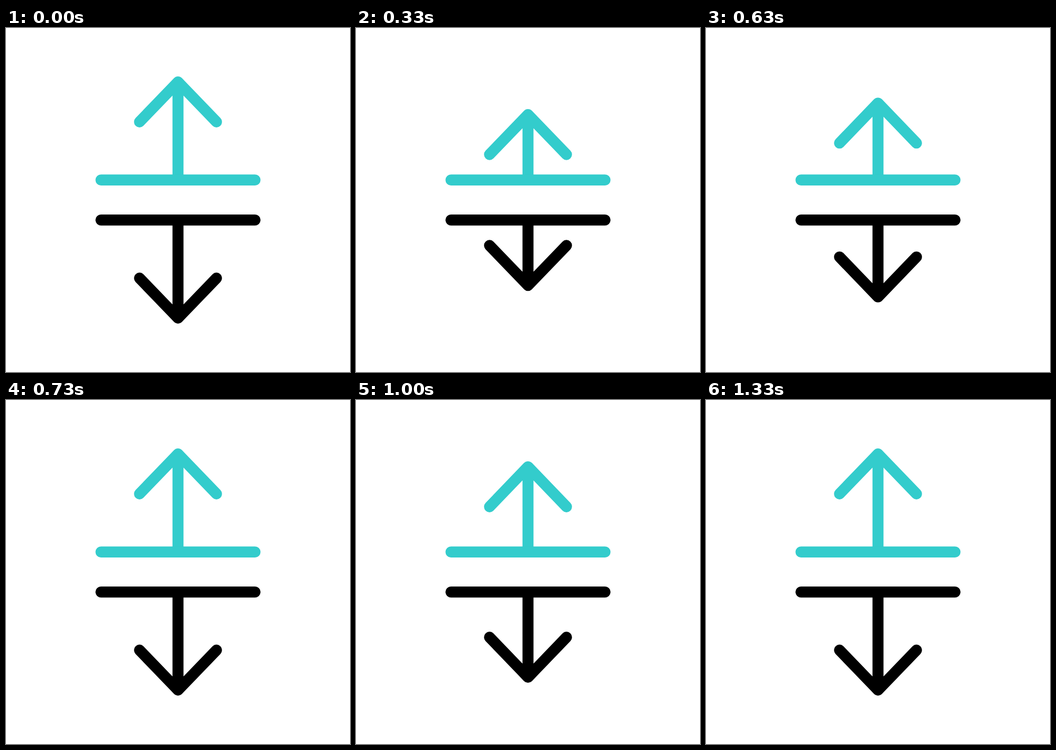
Write an HTML page that moves like this. It is 640 px wide and 640 px high and loops after 2 s.

```html
<!DOCTYPE html>
<html lang="en">
<head>
<meta charset="utf-8">
<title>Expand arrows</title>
<style>
  html, body { margin: 0; width: 100%; height: 100%; overflow: hidden; background: #fff; }
  svg { display: block; width: 100vw; height: 100vh; }
  .half { fill: none; stroke-width: 20.5; stroke-linecap: round; stroke-linejoin: round; }
</style>
</head>
<body>
<svg viewBox="0 0 640 640">
  <defs>
    <clipPath id="above"><rect width="640" height="282.7"/></clipPath>
    <g id="half" class="half">
      <g clip-path="url(#above)">
        <path id="arrow" d="M320 282.7V100.3M248.4 174.7L320 100.3L391.6 174.7"/>
      </g>
      <path d="M176.7 282.7H463.3"/>
    </g>
  </defs>
  <use href="#half" stroke="#33cccc"/>
  <use href="#half" stroke="#000" transform="matrix(1 0 0 -1 0 640)"/>
</svg>
<script>
  const LOOP = 2000, FPS = 30;
  const arrow = document.getElementById('arrow');

  // Smooth 0 to 1, with a chosen speed at the start
  const ease = (p, speed) => p * p * (3 - 2 * p) + speed * p * (1 - p) ** 2;

  // Dip towards the bar and back; speeds apply where the arrow is at rest height
  function dip(n, start, peak, end, depth, speedIn, speedOut) {
    if (n <= start || n >= end) return 0;
    return depth * (n < peak
      ? ease((n - start) / (peak - start), speedIn)
      : ease((end - n) / (end - peak), speedOut));
  }

  // Motion runs in whole steps, with step times rounded to 10 ms
  function draw() {
    const n = Math.floor((performance.now() % LOOP + 3.5) * FPS / 1000);
    const y = dip(n, 0, 16, 22, 78.7, 1, 0) + dip(n, 22, 34.8, 40, 35, 0, 1);
    arrow.setAttribute('transform', `translate(0 ${y.toFixed(2)})`);
    requestAnimationFrame(draw);
  }
  draw();
</script>
</body>
</html>
```
